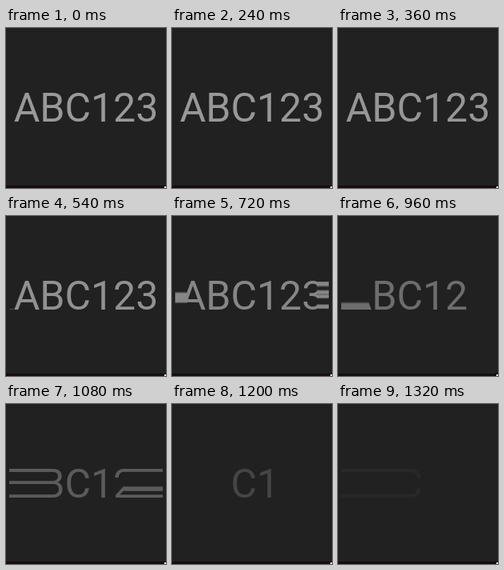
Animation of 200x200 px, one loop 1380 ms. Source, as an HTML page with a canvas:

```html
<!DOCTYPE html>
<html lang="en">
<head>
<meta charset="utf-8">
<title>Text smear</title>
<style>
html, body { margin: 0; width: 100%; height: 100%; overflow: hidden; background: #212121; }
canvas { display: block; width: 200px; height: 200px; }
</style>
</head>
<body>
<canvas id="stage" width="200" height="200"></canvas>
<script>
const SIZE = 200, LOOP = 1380, STEP = 60, FADE = 1350;
const LEFT = 4, RIGHT = 196, TOP = 78, HEIGHT = 44;
const ctx = document.getElementById('stage').getContext('2d');

const label = document.createElement('canvas');
label.width = label.height = SIZE;
const pen = label.getContext('2d');
pen.font = '50px Roboto, sans-serif';
pen.textAlign = 'center';
pen.fillStyle = '#999';
pen.fillText('ABC123', 100, 117);

function rect(color, x, y, w, h) {
  ctx.fillStyle = color;
  ctx.fillRect(x, y, w, h);
}

// Copies a vertical slice of the label, stretched to the given span.
function slice(from, width, to, span) {
  if (width > 0 && span > 0) {
    ctx.drawImage(label, from, TOP, width, HEIGHT, to, TOP, span, HEIGHT);
  }
}

function draw(ms) {
  const eased = Math.min(1, (ms / FADE) ** 3);
  const l = Math.floor(LEFT + 96 * eased);
  const r = 199 - l;

  ctx.globalAlpha = 1;
  rect('#212121', 0, 0, SIZE, SIZE);
  rect('#160c11', 0, 197, SIZE, 3);
  rect('#fff', 198, 198, 2, 2);

  ctx.globalAlpha = 1 - eased;
  ctx.imageSmoothingEnabled = false;
  slice(l, 1, LEFT, l - LEFT);
  slice(l, r - l + 1, l, r - l + 1);
  slice(r, 1, r + 1, RIGHT - r - 1);
}

const start = performance.now();
function tick() {
  const ms = (performance.now() - start) % LOOP;
  draw(Math.floor(ms / STEP) * STEP);
  requestAnimationFrame(tick);
}
tick();
</script>
</body>
</html>
```
